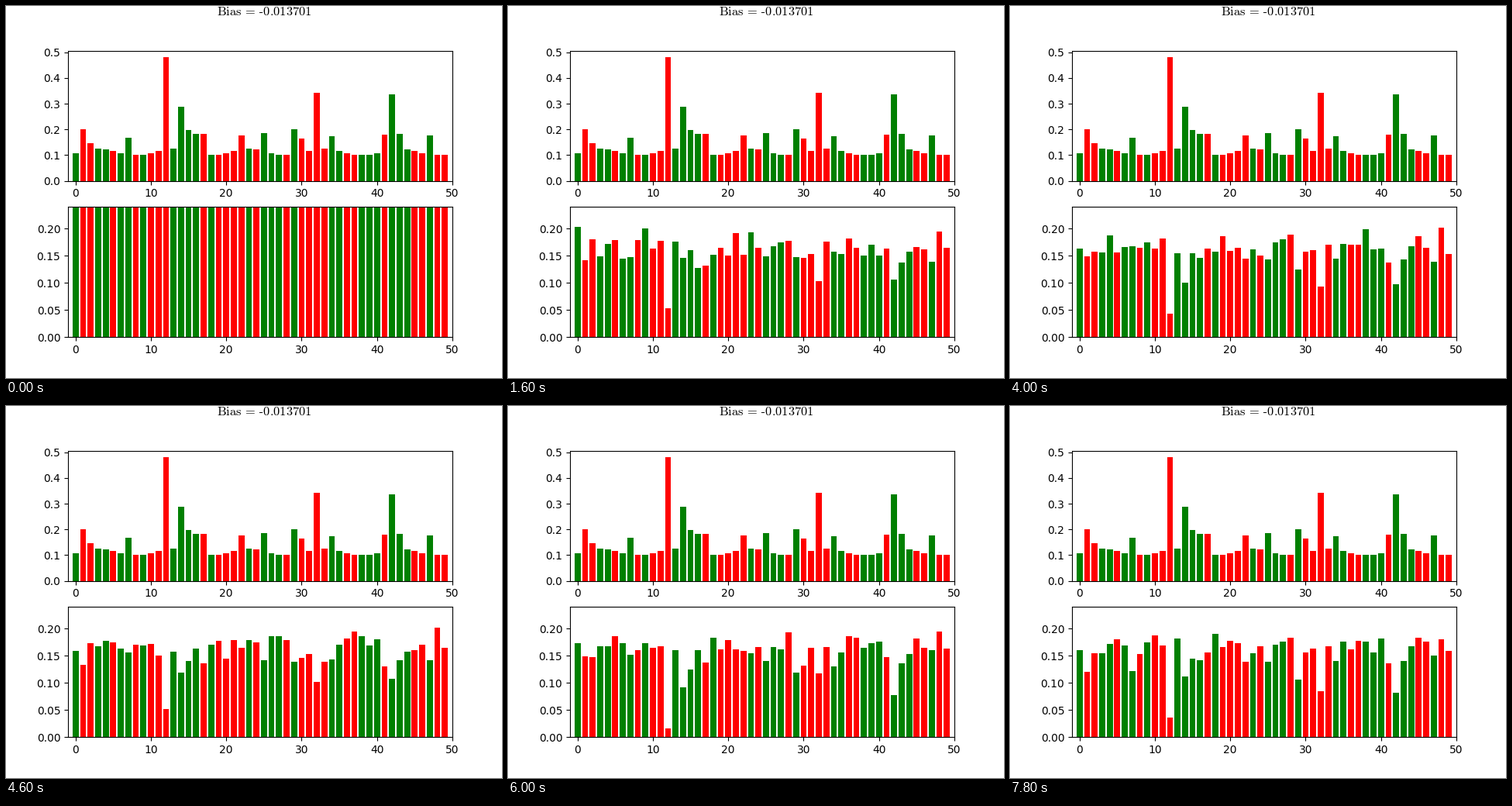
Animation of 640x480 px, one loop 8 s. Source, as a matplotlib script:

```python
import numpy as np
import matplotlib.pyplot as plt
from matplotlib.animation import FuncAnimation
from matplotlib.patches import Rectangle

W, H, DPI = 640, 480, 100
FRAMES, STEP = 40, 200
LEVEL, NOISE, SETTLE = 0.155, 0.012, 5

COLORS = {"r": "red", "g": "green"}
SIGNS = "grrggrggrgrrrggggrgrrrrgrgggrgrrrrggrrgggrgggrrgrr"
PEAKS = {1: 0.2, 2: 0.147, 7: 0.168, 12: 0.482, 14: 0.288, 15: 0.198,
         16: 0.183, 17: 0.182, 22: 0.176, 25: 0.186, 29: 0.2, 30: 0.165,
         32: 0.342, 34: 0.174, 41: 0.18, 42: 0.336, 43: 0.183, 47: 0.177}

x = np.arange(len(SIGNS))

# a gentle wave with tall bars standing out of it
fixed = 0.112 + 0.012 * np.cos(2 * np.pi * (x - 3) / 10)
fixed[list(PEAKS)] = list(PEAKS.values())

# the taller the bar above, the shorter the one below
goal = 0.21 - 0.36 * fixed


def heights(k):
    """Bars start full, then settle from one level to noisy goals."""
    if k == 0:
        return np.ones(len(x))
    rng = np.random.default_rng(100 + k)
    level = goal + (LEVEL - goal) * np.exp(-k / SETTLE)
    return np.clip(level + rng.normal(0, NOISE, len(x)), 0, 0.238)


def bar_plot(ax, values):
    ax.set_xlim(-1, 50)
    return ax.bar(x, values, color=[COLORS[s] for s in SIGNS])


def draw_title(left, base):
    text = (r"$\mathrm{Bias}\hspace{0.18}=\hspace{0.56}"
            r"\mathrm{0.013701}$")
    fig.text(left / W, 1 - base / H, text, size=11.8, ha="left",
             va="baseline", math_fontfamily="cm")
    # short hyphen, since math text would set a wide minus
    fig.add_artist(Rectangle(((left + 54.7) / W, 1 - (base - 3) / H),
                             4.2 / W, 1 / H, color="black", lw=0,
                             transform=fig.transFigure))


fig, (upper, lower) = plt.subplots(2, 1, figsize=(W / DPI, H / DPI), dpi=DPI)
fig.subplots_adjust(left=0.125, right=0.9, bottom=0.11, top=0.88, hspace=0.2)
bar_plot(upper, fixed)
bars = bar_plot(lower, heights(0))
lower.set_ylim(0, 0.24)
draw_title(272.5, 12)


def update(k):
    for bar, h in zip(bars, heights(k)):
        bar.set_height(h)
    return bars.patches


anim = FuncAnimation(fig, update, frames=FRAMES, interval=STEP,
                     repeat=True, repeat_delay=0)
plt.show()
```
